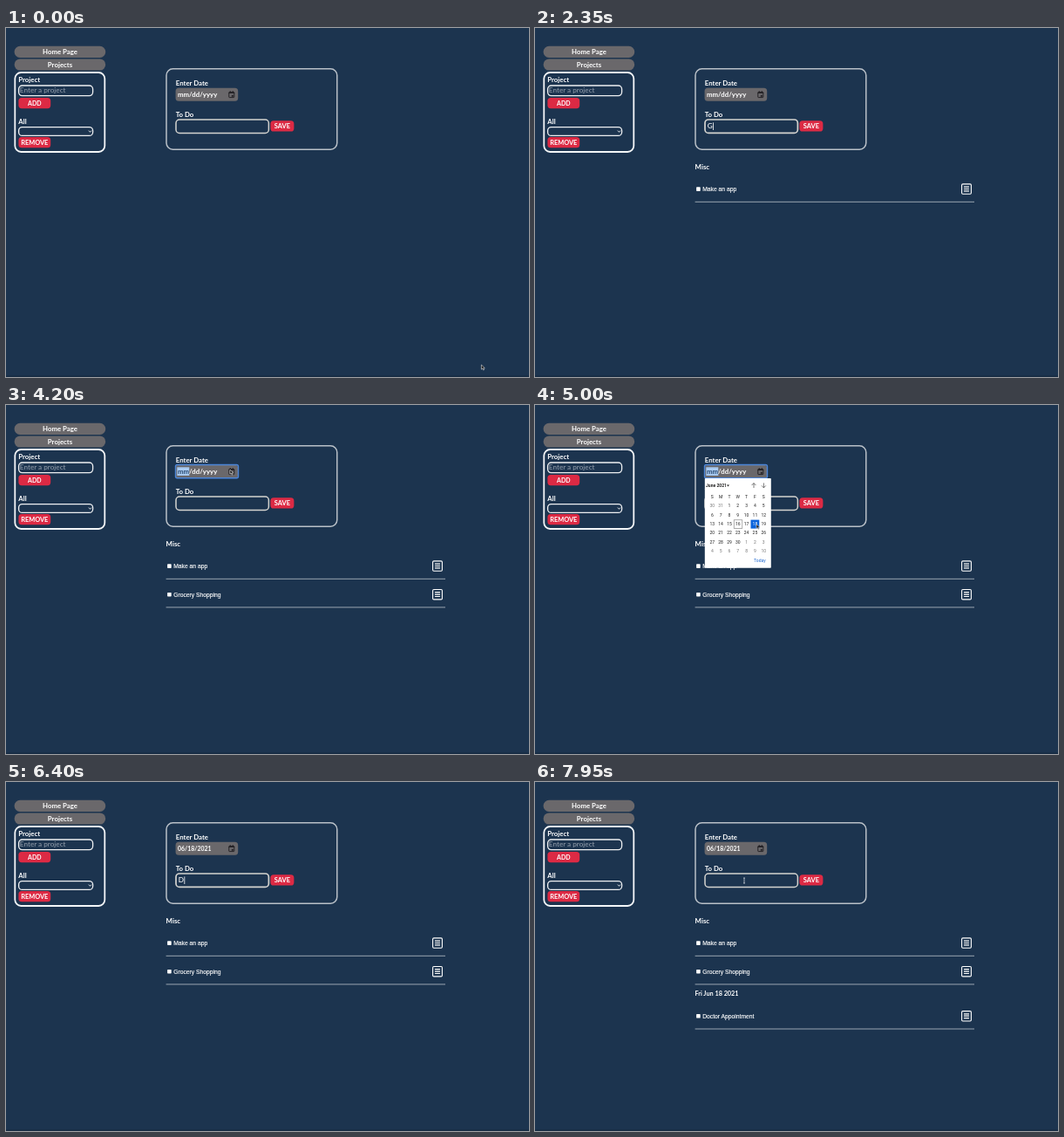
These frames come from a looping animation (600x400 px, 8 s). An HTML page:

```html
<!DOCTYPE html>
<html lang="en">
<head>
<meta charset="utf-8">
<title>To-do app</title>
<style>
html, body { margin: 0; width: 100%; height: 100%; overflow: hidden; background: #1c344f; }
svg { display: block; width: 100vw; height: 100vh; }
text { font: 700 7.8px Lato, "Open Sans", sans-serif; fill: #fff; }
.mid { text-anchor: middle; }
.typed { font-weight: 500; font-size: 8.2px; }
.plain { font-family: "Liberation Sans", Arial, sans-serif; font-weight: 400; font-size: 6.75px; stroke: #fff; stroke-width: .15; }
.cal text { font: 400 5px Roboto, Arial, sans-serif; fill: #222; text-anchor: middle; }
.cal .strong { font-weight: 700; }
.cal .dim { fill: #777; }
.cal .lit { fill: #fff; }
</style>
</head>
<body>
<svg id="stage" viewBox="0 0 600 400"></svg>
<script>
const LOOP = 8000;
const stage = document.getElementById('stage');
const $ = id => document.getElementById(id);

const box = (x, y, w, h, r, attrs) =>
  `<rect x="${x}" y="${y}" width="${w}" height="${h}" rx="${r}" ${attrs}/>`;
const frame = (x, y, w, h, r, color, width) =>
  box(x, y, w, h, r, `fill="none" stroke="${color}" stroke-width="${width}"`);
const label = (x, y, str, attrs = '') => `<text x="${x}" y="${y}" ${attrs}>${str}</text>`;
const line = (d, color, width) =>
  `<path d="${d}" fill="none" stroke="${color}" stroke-width="${width}"/>`;
const group = (id, body, attrs = '') => `<g id="${id}" ${attrs}>${body}</g>`;

const pill = (y, str) => box(9.6, y, 104.6, 13.2, 6.5, 'fill="#6a686b"') +
  label(62, y + 9.3, str, 'class="mid"');
const button = (x, y, w, str, size) => box(x, y, w, 12.2, 3.6, 'fill="#dc2a44"') +
  label(x + w / 2, y + 8.7, str, `class="mid" style="font-size:${size}px"`);

function sidebar() {
  return pill(20.8, 'Home Page') + pill(35.4, 'Projects') +
    frame(10.3, 51, 103, 91, 7, '#f4f6f8', 1.8) +
    label(14.3, 62.4, 'Project') +
    frame(14.6, 66, 85, 11.6, 4, '#eef0f2', 1.3) +
    label(15.8, 74.4, 'Enter a project', 'class="typed" style="fill:#8f9aa8"') +
    button(14.4, 80, 36.8, 'ADD', 7) +
    label(14.3, 110, 'All') +
    frame(14.6, 113.6, 85, 9.8, 4, '#eef0f2', 1.3) +
    line('M94.9 117.6l1.6 1.7l1.6-1.7', '#fff', .9) +
    button(14.4, 125.1, 36.8, 'REMOVE', 7.4);
}

function form() {
  const icon = frame(255.8, 73.6, 6, 6, .5, '#242226', 1) +
    line('M255.5 74.4h6.6M257.3 72.2v1.5M260.3 72.2v1.5', '#242226', 1.3) +
    box(258.8, 76.8, 2, 2, 0, 'fill="#242226"');
  return frame(184, 46.8, 195.8, 92.4, 7.5, '#b9c0c8', 1.5) +
    label(194.8, 65.6, 'Enter Date') +
    box(194.6, 68.8, 71.6, 15, 3.6, 'fill="#6a686b"') +
    group('ring', frame(194.5, 68.5, 72, 15.2, 2, '#4d86d8', 1.4) +
      box(196.3, 71.3, 14, 9.6, 0, 'id="segment" fill="#a9cbf2"')) +
    '<text id="date" x="197" y="79.1"></text>' + icon +
    label(194.8, 102, 'To Do') +
    box(195, 105, 106.4, 15.4, 4, 'id="field" fill="none" stroke="#d4d3cf"') +
    '<text id="todo" class="typed" x="197.8" y="115.1"></text>' +
    box(0, 108.4, .8, 8.6, 0, 'id="caret" fill="#fff"') +
    button(303.4, 106.3, 27, 'SAVE', 7.5);
}

const item = (y, str) => box(185.1, y - 2.4, 4.6, 4.6, .7, 'fill="#fff"') +
  label(192.2, y + 2.4, str, 'class="plain"') +
  frame(489.6, y - 5.8, 10.8, 11.4, 1.2, '#fff', 1.1) +
  line(`M492 ${y - 2.6}h6M492 ${y - .2}h6M492 ${y + 2.2}h6`, '#fff', 1.2) +
  line(`M183.6 ${y + 14.6}H504`, '#a8b1bc', .9);

function calendar() {
  const col = i => 203.3 + i * 9.82;
  let s = box(194.8, 84, 76, 102.8, .8, 'fill="#fff"') +
    label(208, 94, 'June 2021', 'class="strong"') +
    '<path d="M220 91.4h3l-1.5 2z" fill="#222"/>' +
    line('M251 95v-5.4M248.6 92l2.4-2.5l2.4 2.5M262.4 89.4v5.4M260 92.4l2.4 2.5l2.4-2.5', '#444', .7);
  [...'SMTWTFS'].forEach((d, i) => s += label(col(i), 107.3, d));
  s += frame(228.2, 131.8, 9.6, 9.6, 0, '#777', .6) +
    box(247.5, 131.6, 9.8, 10, 0, 'id="pick" fill="#0b63dc"');
  for (let i = 0; i < 42; i++) {
    const n = i - 1;
    const day = n < 1 ? n + 31 : n > 30 ? n - 30 : n;
    const kind = n < 1 || n > 30 ? 'class="dim"' : n === 18 ? 'id="chosen"' : '';
    s += label(col(i % 7), 117.4 + Math.floor(i / 7) * 10.3, day, kind);
  }
  return s + label(257.8, 180.3, 'Today', 'style="fill:#1a66d0"');
}

stage.innerHTML =
  box(0, 0, 600, 400, 0, 'fill="#1c344f"') + box(0, 398.4, 600, 1.6, 0, 'fill="#162b43"') +
  sidebar() + form() +
  group('first', label(183.6, 161.6, 'Misc') + item(184.7, 'Make an app')) +
  group('second', item(217.3, 'Grocery Shopping')) +
  group('third', label(183.4, 245.3, 'Fri Jun 18 2021', 'style="font-size:7.3px"') +
    item(268.4, 'Doctor Appointment')) +
  group('calendar', calendar(), 'class="cal"') +
  group('mouse',
    '<path id="arrow" d="M0 0v5.2l1.3-1.1l.9 2l.9-.4l-.9-1.9h1.7z" fill="#151515" stroke="#e8e8e8" stroke-width=".6"/>' +
    group('beam', line('M-1 -3h2M0 -3v6M-1 3h2', '#dfe3e8', .7)));

// Each entry: focus time, first key, ms per key, submit time.
const tasks = [
  { str: 'Make an app', focus: 800, start: 950, step: 65, end: 1800, row: 'first' },
  { str: 'Grocery Shopping', focus: 2200, start: 2350, step: 70, end: 3550, row: 'second' },
  { str: 'Doctor Appointment', focus: 5800, start: 6350, step: 65, end: 7800, row: 'third' }
];
const DATE_FOCUS = 4150, CAL_OPEN = 4300, CAL_HOVER = 4850, CAL_PICK = 5150;

// Mouse stops: time, x, y
const stops = [
  [0, 545.4, 386], [80, 545.4, 386], [700, 252, 113], [1900, 252, 113], [2150, 246, 113],
  [3700, 246, 113], [4080, 257, 74], [4400, 257, 74], [4900, 254, 136.5],
  [5250, 254, 136.5], [5700, 240, 113], [8000, 240, 113]
];

function mouseAt(t) {
  const i = Math.max(1, stops.findIndex(s => s[0] > t));
  const [a, b] = [stops[i - 1], stops[i]];
  const p = (t - a[0]) / (b[0] - a[0]);
  const e = p * p * (3 - 2 * p);
  return [a[1] + (b[1] - a[1]) * e, a[2] + (b[2] - a[2]) * e];
}

const show = (id, on) => $(id).setAttribute('visibility', on ? 'visible' : 'hidden');

function draw(t) {
  const active = tasks.find(k => t >= k.focus && t < k.end);
  const count = active ? Math.max(0, Math.floor((t - active.start) / active.step) + 1) : 0;
  const todo = $('todo');
  todo.textContent = active ? active.str.slice(0, count) : '';
  $('caret').setAttribute('x', 198.2 + (count ? todo.getComputedTextLength() : 0));
  show('caret', active && (count > 0 || (t - active.focus) % 1000 < 500));
  $('field').setAttribute('stroke-width', active ? 1.7 : 1.5);
  tasks.forEach(k => show(k.row, t >= k.end));

  const picked = t >= CAL_PICK;
  const dateOn = t >= DATE_FOCUS && t < tasks[2].focus;
  const first = picked ? '06' : 'mm';
  $('date').innerHTML = `<tspan fill="${dateOn ? '#27486f' : '#fff'}">${first}</tspan>` +
    (picked ? '/18/2021' : '/dd/yyyy');
  $('date').style.fontSize = picked ? '6.9px' : '7.8px';
  $('segment').setAttribute('width', picked ? 9 : 14);
  show('ring', dateOn);
  show('calendar', t >= CAL_OPEN && !picked);
  const hover = t >= CAL_HOVER && !picked;
  show('pick', hover);
  $('chosen').setAttribute('class', hover ? 'lit' : '');

  const [x, y] = mouseAt(t);
  const typing = tasks.some(k => t >= k.start && t < k.end + 100);
  const overField = x > 195 && x < 301 && y > 105 && y < 121 && (t < CAL_OPEN || picked);
  $('mouse').setAttribute('transform', `translate(${x} ${y})`);
  show('arrow', !typing && !overField);
  show('beam', !typing && overField);
}

const began = performance.now();
function tick() {
  draw((performance.now() - began) % LOOP);
  requestAnimationFrame(tick);
}
tick();
</script>
</body>
</html>
```
